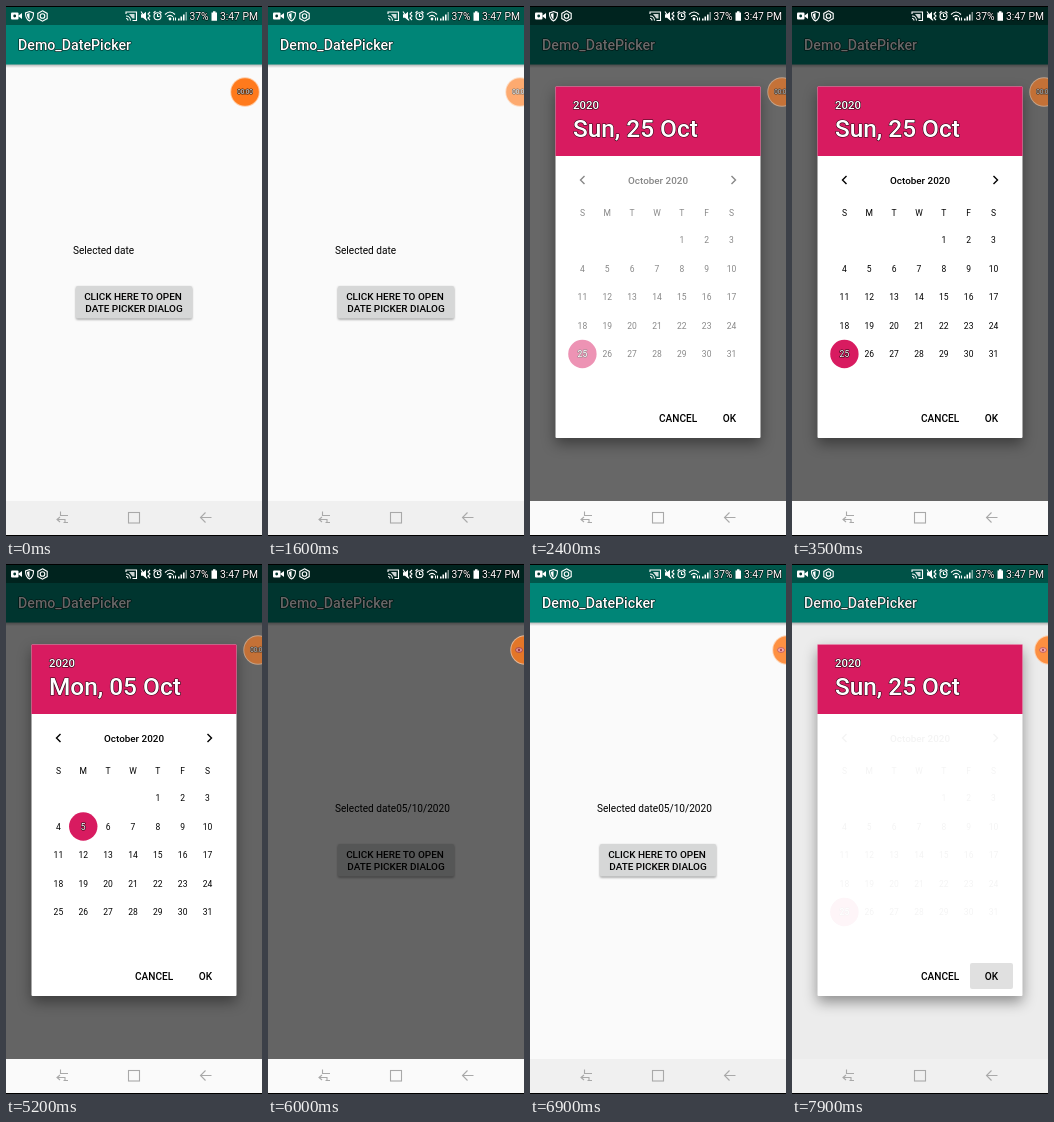
These frames come from a looping animation (256 by 530 pixels, 8 s). An HTML page:

```html
<!DOCTYPE html>
<html lang="en">
<head>
<meta charset="utf-8">
<title>Date picker demo</title>
<style>
html, body { margin: 0; width: 100%; height: 100%; overflow: hidden; background: #000; }
svg { display: block; width: 256px; height: 530px; font-family: Roboto, sans-serif; }
.medium { font-weight: 500; }
.mid { text-anchor: middle; }
.outlined { fill: #fff; stroke: #000c; stroke-width: 1.2px; stroke-linejoin: round; paint-order: stroke; }
.line { fill: none; stroke: #fff; stroke-width: 1.1; }
.nav { fill: none; stroke: #a9a9a9; stroke-width: 1.1; }
.raised { filter: drop-shadow(0 1px 1px #0006); }
.card { filter: drop-shadow(0 6px 7px #0006); }

.dim, .dialog, .calendar, .before, .after, .result, .day-ripple, .ok-ripple, .press, .bubble, .clock, .mark, .navbar {
  animation: 8s linear infinite;
}
.dim { animation-name: dim; }
.dialog { animation-name: dialog; }
.calendar { animation-name: calendar; }
.before { animation-name: before; animation-timing-function: step-end; }
.after { animation-name: after; animation-timing-function: step-end; }
.result { animation-name: result; animation-timing-function: step-end; }
.day-ripple { animation-name: day-ripple; }
.ok-ripple { animation-name: ok-ripple; }
.press { animation-name: press; transform-origin: 128px 296px; }
.bubble { animation-name: bubble; }
.clock { animation-name: clock; animation-timing-function: step-end; }
.mark { animation-name: mark; animation-timing-function: step-end; }
.navbar { animation-name: navbar; }

@keyframes dim {
  0% { opacity: 0; }
  27.35% { opacity: 0; animation-timing-function: cubic-bezier(.5, 1, .89, 1); }
  30.5%, 75% { opacity: .6; }
  80%, 98.6% { opacity: 0; }
  98.75% { opacity: .05; }
  100% { opacity: .37; }
}
@keyframes navbar {
  0%, 27.4% { fill: #f0f0f0; }
  30%, 78% { fill: #fafafa; }
  82%, 100% { fill: #f0f0f0; }
}
@keyframes dialog {
  0%, 27.3% { opacity: 0; }
  27.35%, 73.1% { opacity: 1; }
  74.4%, 98.55% { opacity: 0; }
  98.6%, 100% { opacity: 1; }
}
@keyframes calendar {
  0%, 27.25% { opacity: 0; }
  33.1%, 74.5% { opacity: 1; }
  74.6%, 98.5% { opacity: 0; }
  100% { opacity: .25; }
}
@keyframes before { 0% { opacity: 1; } 55% { opacity: 0; } 80%, 100% { opacity: 1; } }
@keyframes after { 0% { opacity: 0; } 55% { opacity: 1; } 80%, 100% { opacity: 0; } }
@keyframes result { 0% { opacity: 0; } 73.75%, 100% { opacity: 1; } }
@keyframes day-ripple {
  0%, 53.6% { opacity: 0; }
  54.5%, 56% { opacity: .2; }
  61.25%, 100% { opacity: 0; }
}
@keyframes ok-ripple {
  0%, 71.1% { opacity: 0; }
  72%, 100% { opacity: .12; }
}
@keyframes press {
  0%, 26% { opacity: 0; transform: scale(.2); }
  26.3% { opacity: .1; transform: scale(.3); }
  28.5% { opacity: .1; transform: scale(1); }
  31%, 92.3% { opacity: 0; transform: scale(.2); }
  92.6% { opacity: .1; transform: scale(.3); }
  96% { opacity: .1; transform: scale(1); }
  100% { opacity: 0; transform: scale(1); }
}
@keyframes bubble {
  0%, 13.6% { transform: translateX(239px); opacity: 1; }
  16.5% { transform: translateX(252px); opacity: 1; }
  20%, 68.7% { transform: translateX(252px); opacity: .62; }
  68.75%, 100% { transform: translateX(257px); opacity: .82; }
}
@keyframes clock { 0% { opacity: 1; } 68.75%, 100% { opacity: 0; } }
@keyframes mark { 0% { opacity: 0; } 68.75%, 100% { opacity: 1; } }
</style>
</head>
<body>
<svg viewBox="0 0 256 530">
  <defs>
    <clipPath id="buttonClip"><rect x="70" y="280" width="116" height="32.5" rx="1.5"/></clipPath>
    <linearGradient id="barShadow" x2="0" y2="1">
      <stop stop-color="#000" stop-opacity=".3"/>
      <stop offset="1" stop-color="#000" stop-opacity="0"/>
    </linearGradient>
  </defs>

  <!-- App screen -->
  <rect y="1" width="256" height="494" fill="#fafafa"/>
  <rect y="58" width="256" height="4" fill="url(#barShadow)"/>
  <rect y="18" width="256" height="40.5" fill="#008577"/>
  <rect y="1" width="256" height="18" fill="#00574b"/>
  <text class="outlined medium" x="12" y="43.5" font-size="14.2">Demo_DatePicker</text>
  <text x="67" y="248" font-size="10.1">Selected date<tspan class="result" id="result"></tspan></text>
  <rect class="raised" x="70" y="280" width="116" height="32.5" rx="1.5" fill="#d6d7d7"/>
  <g clip-path="url(#buttonClip)"><circle class="press" cx="128" cy="296" r="62"/></g>
  <g class="medium mid" font-size="9.95">
    <text x="127" y="293.8">CLICK HERE TO OPEN</text>
    <text x="128" y="305.5">DATE PICKER DIALOG</text>
  </g>

  <rect class="dim" y="1" width="256" height="494"/>

  <!-- Status bar -->
  <g fill="#fff">
    <rect x="5" y="6.5" width="7.5" height="7" rx="1"/>
    <path d="M12 10l4-3v6z"/>
    <circle cx="8.7" cy="10" r="1.4" fill="#00352e"/>
    <path class="line" d="M23.5 5.5l4 1.5c0 4-1 6.500-4 8c-3-1.500-4-4-4-8z"/>
    <path d="M23.500 7v6.500c-1.800-1.300-2.500-3-2.500-5.500z"/>
    <path class="line" d="M36.500 4.800l4.700 2.600v5.200l-4.700 2.600l-4.700-2.600v-5.200z"/>
    <circle class="line" cx="36.500" cy="10" r="2.300"/>
    <path class="line" d="M120 8v-2h10.500v8.500h-4M120 10a4.500 4.500 0 0 1 4.500 4.500M120 12.500a2 2 0 0 1 2 2"/>
    <path d="M123 8h5.500v4.500h-2z" opacity=".8"/>
    <path d="M135 8.300h2l3-2.500v8.500l-3-2.500h-2z"/>
    <path class="line" d="M135 5.500l6 9M144 6l-2 2l2 2l-2 2l2 2"/>
    <circle class="line" cx="151.500" cy="10.300" r="3.500"/>
    <path class="line" d="M151.500 8v2.500h2M147.500 7l2-1.800M155.500 7l-2-1.800"/>
    <path class="line" d="M159 8.500q5-5 10 0M161 10.800q3-3 6 0"/>
    <circle cx="164" cy="13" r="1.400"/>
    <path class="line" d="M167.500 14.500v-3M169.500 14.500v-3"/>
    <path d="M172 12.500h1.600v2h-1.600zM174.500 10.500h1.600v4h-1.600zM177 8.500h1.600v6h-1.600z"/>
    <path d="M179.500 6h1.500v8.500h-1.500z" opacity=".5"/>
    <path d="M205.500 6.500h1.500v-1.200h2.500v1.200h1.500v8.200h-5.500z"/>
    <g class="outlined" font-size="10.300">
      <text x="183.500" y="14">37%</text>
      <text x="214" y="14">3:47 PM</text>
    </g>
  </g>

  <!-- Navigation bar -->
  <rect class="navbar" y="495" width="256" height="34"/>
  <g class="nav">
    <path d="M51 513.500h8v3.500M54 511l-3 2.500l3 2.500M62 509.500h-7.500v-4M57.500 516.500h4.500"/>
    <rect x="122.500" y="506.500" width="11" height="10.500"/>
    <path d="M205.500 511.500h-11M199.500 506.500l-5 5l5 5"/>
  </g>

  <!-- Date dialog -->
  <g class="dialog">
    <rect class="card" x="25.500" y="80.500" width="205" height="351.500" rx="1" fill="#fff"/>
    <rect x="25.500" y="80.500" width="205" height="69.500" fill="#d81b60"/>
    <g class="outlined medium">
      <text x="43" y="103" font-size="11.400">2020</text>
      <g font-size="24.400">
        <text class="before" x="43" y="130.500">Sun, 25 Oct</text>
        <text class="after" x="43" y="130.500">Mon, 05 Oct</text>
      </g>
    </g>
    <g class="calendar">
      <path d="M54.500 170l-4 4l4 4M201.500 170l4 4l-4 4" fill="none" stroke="#000" stroke-width="1.400"/>
      <text class="medium mid" x="128" y="177.600" font-size="9.900">October 2020</text>
      <g id="days" class="mid" font-size="8.500"></g>
    </g>
    <rect class="ok-ripple" x="178" y="399" width="43" height="26" rx="2"/>
    <g class="medium" font-size="10.100">
      <text x="129" y="415.500">CANCEL</text>
      <text x="192.800" y="415.500">OK</text>
    </g>
  </g>

  <!-- Recorder bubble -->
  <g class="bubble">
    <circle cy="86" r="14.700" fill="#ffc9a0"/>
    <circle cy="86" r="13.800" fill="#ff7a1c"/>
    <text id="clock" class="clock outlined mid" y="88.300" font-size="6.300"></text>
    <g class="mark">
      <ellipse cx="-6" cy="86" rx="3.500" ry="2.400" fill="#f9a0a0" stroke="#a33" stroke-width=".8"/>
      <circle cx="-6" cy="86" r="1.200" fill="#a02838"/>
    </g>
  </g>
</svg>
<script>
const days = document.getElementById('days');
const clock = document.getElementById('clock');
const columnX = col => 52.400 + col * 24.850;
const rowY = row => 234 + row * 28.500;
const label = (x, y, text, cls = '') => `<text class="${cls}" x="${x}" y="${y + 3}">${text}</text>`;
const place = day => [columnX((day + 3) % 7), rowY(Math.floor((day + 3) / 7))];
const selected = (day, cls) => {
  const [x, y] = place(day);
  return `<g class="${cls}"><circle cx="${x}" cy="${y}" r="14.200" fill="#d81b60"/>${label(x, y, day, 'outlined')}</g>`;
};

let markup = [...'SMTWTFS'].map((name, col) => label(columnX(col), 207, name)).join('');
for (let day = 1; day <= 31; day++) markup += label(...place(day), day);
const [rippleX, rippleY] = place(5);
markup += selected(25, 'before') + selected(5, 'after');
markup += `<circle class="day-ripple" cx="${rippleX}" cy="${rippleY}" r="14.200"/>`;
days.innerHTML = markup;
document.getElementById('result').textContent = '05/10/2020';

function tick() {
  const seconds = Math.floor(performance.now() % 8000 / 1000);
  clock.textContent = `00:0${seconds}`;
  requestAnimationFrame(tick);
}
tick();
</script>
</body>
</html>
```
